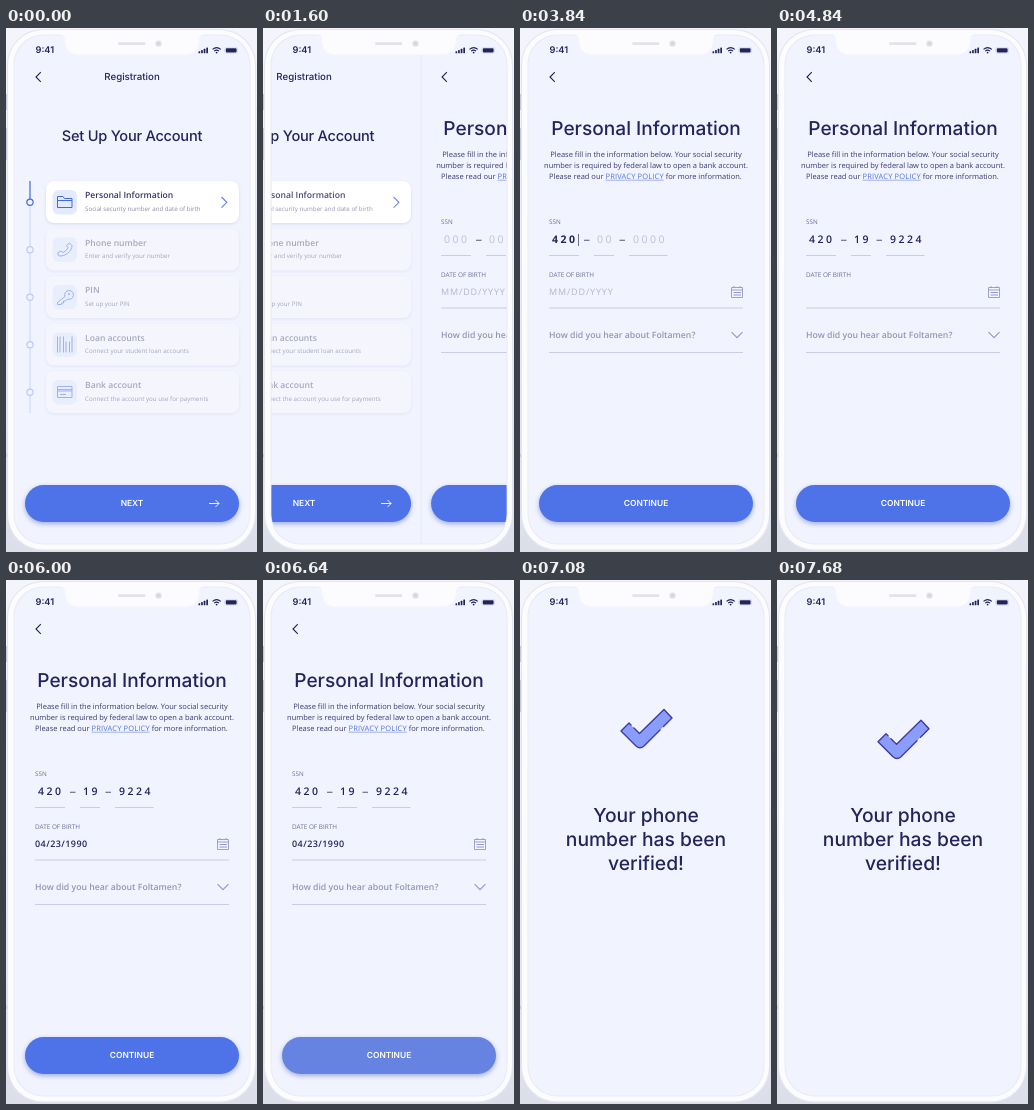
Recreate the animation shown at these times as an HTML page with a canvas. Size 251 by 524 pixels, loop 8000 ms.

```html
<!DOCTYPE html>
<html lang="en">
<head>
<meta charset="utf-8">
<title>Account setup</title>
<style>
html, body { margin: 0; width: 100%; height: 100%; overflow: hidden; background: #eef0f9; }
canvas { display: block; width: 251px; height: 524px; }
</style>
</head>
<body>
<canvas id="stage"></canvas>
<script>
const W = 251, H = 524, LOOP = 8000, PAGE = 234, MID = 126;
const NAVY = '#23245a', BLUE = '#4468dc', PALE = '#c9cce3', SCREEN = '#f1f3ff';
const HEAD = 'Inter, sans-serif', BODY = '"Open Sans", "Noto Sans", sans-serif';

const canvas = document.getElementById('stage');
const ctx = canvas.getContext('2d');
const ratio = window.devicePixelRatio || 1;
canvas.width = W * ratio;
canvas.height = H * ratio;

const clamp = v => Math.max(0, Math.min(1, v));
const ramp = (t, from, to) => clamp((t - from) / (to - from));
const ease = u => u < .5 ? 2 * u * u : 1 - 2 * (1 - u) * (1 - u);
const within = (t, ...spans) => spans.some(([a, b]) => t >= a && t < b);

function text(str, x, y, size, { font = BODY, weight = 400, color = NAVY, align = 'left', gap = 0 } = {}) {
  ctx.font = `${weight} ${size}px ${font}`;
  ctx.letterSpacing = gap + 'px';
  ctx.textAlign = align;
  ctx.fillStyle = color;
  ctx.fillText(str, x, y);
  return ctx.measureText(str).width;
}

function box(x, y, w, h, r, fill) {
  ctx.beginPath();
  ctx.roundRect(x, y, w, h, r);
  ctx.fillStyle = fill;
  ctx.fill();
}

function shadowed(color, blur, dy, draw) {
  ctx.save();
  ctx.shadowColor = color;
  ctx.shadowBlur = blur * ratio;
  ctx.shadowOffsetY = dy * ratio;
  draw();
  ctx.restore();
}

function stroke(path, color, width = 1) {
  ctx.strokeStyle = color;
  ctx.lineWidth = width;
  ctx.stroke(new Path2D(path));
}

function dot(x, y, r, fill) {
  ctx.beginPath();
  ctx.arc(x, y, r, 0, 7);
  ctx.fillStyle = fill;
  ctx.fill();
}

function backArrow() {
  stroke('M34.8 44.2L30 49L34.8 53.8', NAVY, 1.1);
}

function button(label, pressed = 0) {
  const mix = (a, b) => Math.round(a + (b - a) * pressed);
  const fill = `rgb(${mix(78, 102)},${mix(115, 131)},${mix(232, 226)})`;
  shadowed('rgba(60,85,180,.45)', 5, 2, () => box(19, 457, 214, 37, 18.5, fill));
  text(label, MID, 478.4, 8.4, { font: HEAD, weight: 600, color: '#fff', align: 'center' });
}

const steps = [
  ['Personal Information', 'Social security number and date of birth',
    'M51.5 179V168.5H57L58.5 170.5H66V179.5H51.5ZM51.5 172.5H66'],
  ['Phone number', 'Enter and verify your number',
    'M63.5 167.5L66 170C66 176 59 181 53 180.5L51.5 177.5L55 175.5L57 177C60 175.5 61 174 62 172L60.5 170Z'],
  ['PIN', 'Set up your PIN',
    'M59 173.5A4.4 4.4 0 1 1 61.5 176L59.5 178H57.5V180H55.5V181.5H51.5V179.5ZM62.5 170.5h1v1h-1z'],
  ['Loan accounts', 'Connect your student loan accounts',
    'M51.5 166V182M54 166V182M57.5 166V182M60 171V182M63.5 171V182M66 166V182'],
  ['Bank account', 'Connect the account you use for payments',
    'M51.5 168.5H66V179.5H51.5ZM51.5 171.5H66M51.5 173H66M54 176.5H60']
];

function setupPage(t) {
  backArrow();
  text('Registration', MID, 52.4, 9.7, { font: HEAD, weight: 500, align: 'center' });
  text('Set Up Your Account', MID, 113, 14.6, { font: HEAD, weight: 500, align: 'center', gap: -.25 });

  stroke('M24 177V385', '#cbd5f6');
  stroke('M24 153V171', BLUE, 1.2);
  steps.forEach(([title, note, icon], i) => {
    const first = i === 0;
    ctx.save();
    ctx.translate(0, i * 47.5);
    dot(24, 174.3, 3.7, first ? BLUE : '#bccaf5');
    dot(24, 174.3, 2.5, SCREEN);
    shadowed(first ? 'rgba(70,80,140,.16)' : 'rgba(70,80,140,.09)', 3, 1,
      () => box(40, 153, 193, 42, 8, first ? '#fff' : '#f5f6fd'));
    if (first) ctx.globalAlpha = 1 - .1 * ramp(t, 1240, 1360);
    box(46.5, 162, 24.5, 24.5, 6, first ? '#e3eafd' : '#e9eefc');
    stroke(icon, first ? BLUE : '#9db2ef');
    text(title, 79, 170.3, 8.6, { weight: 600, color: first ? '#34356a' : '#a6a8be' });
    text(note, 79, 182.6, 6.2, { color: first ? '#8b8da9' : '#a3a5bb' });
    if (first) stroke('M215.5 169L220.8 174.3L215.5 179.6', '#6387ea', 1.2);
    ctx.restore();
  });
  button('NEXT');
  stroke('M203 475.5H213M209.5 472L213 475.5L209.5 479', '#fff', .9);
}

function cursor(x, y, h) {
  ctx.fillStyle = '#4c4e80';
  ctx.fillRect(x, y, .8, h);
}

// Three digit groups share one running count of typed digits.
function ssnField(t) {
  const typed = t < 3640 ? 0 : Math.min(9, 1 + Math.floor((t - 3640) / 70));
  const active = within(t, [3640, 4240]);
  const showCursor = within(t, [2840, 3120], [3400, 4240]);
  let start = 0, caret = 31.2;
  for (const [digits, x] of [['420', 32], ['19', 77], ['9224', 113]]) {
    const n = Math.max(0, Math.min(digits.length, typed - start));
    const current = active && typed > start && typed <= start + digits.length;
    [...digits].forEach((d, i) => text(i < n ? d : '0', x + i * 8.5, 215.4, 10.5,
      i < n ? { weight: current ? 700 : 600 } : { color: '#bec0d7' }));
    if (n) caret = x + n * 8.5 + .5;
    start += digits.length;
  }
  stroke('M64 212.3H69.5M99.5 212.3H105', '#55577f', 1.1);
  stroke('M29 227.5H59M74 227.5H94M109 227.5H147.5', PALE);
  if (showCursor) cursor(caret, 206, 12);
}

function dateField(t) {
  const date = '04/23/1990';
  const typed = t < 5680 ? 0 : Math.min(10, 1 + Math.floor((t - 5680) / 32));
  ctx.globalAlpha = 1 - ramp(t, 4740, 4820);
  text('MM/DD/YYYY', 29, 266.7, 9, { color: '#b3b5cd', gap: .85 });
  ctx.globalAlpha = 1;
  const width = text(date.slice(0, typed), 29, 266.7, 9, { weight: 600, gap: .45 });
  if (within(t, [5000, 5320], [5520, 6000])) cursor(28.6 + width, 258, 10);
  stroke('M29 280H223', PALE);
  stroke('M211.5 259.5H222.5V269.5H211.5ZM211.5 262H222.5M214 258V260M220 258V260', '#9698c6', .9);
  stroke('M213.5 264.5H221M213.5 267H221', '#9698c6', 1);
}

function infoPage(t) {
  backArrow();
  text('Personal Information', MID, 106.7, 19.1, { font: HEAD, weight: 500, align: 'center' });

  const small = { color: '#3b3c6c', align: 'center' };
  text('Please fill in the information below. Your social security', MID, 128.6, 7.5, small);
  text('number is required by federal law to open a bank account.', MID, 139.6, 7.5, small);
  const run = { color: '#3b3c6c' }, link = { color: '#5576dc', gap: .15 };
  let x = 29;
  x += text('Please read our ', x, 150.6, 7.5, run);
  const w = text('PRIVACY POLICY', x, 150.6, 7.5, link);
  stroke(`M${x} 152.2h${w}`, '#7d97e6', .7);
  text(' for more information.', x + w, 150.6, 7.5, run);

  text('SSN', 29, 196.3, 6.3, { color: '#6d6f94' });
  ssnField(t);
  text('DATE OF BIRTH', 29, 248.6, 6.4, { color: '#6d6f94' });
  dateField(t);
  text('How did you hear about Foltamen?', 29, 310, 8.7, { weight: 600, color: '#9496b3' });
  stroke('M211.5 304.2L217 309.7L222.5 304.2', '#9698c6', 1.1);
  stroke('M29 324.5H223', PALE);
  button('CONTINUE', ramp(t, 6440, 6640));
}

function verifiedPage(t) {
  const drop = -11.5 + 12.3 * ease(ramp(t, 7040, 7280)) - .8 * ease(ramp(t, 7300, 7680));
  ctx.save();
  ctx.translate(0, 10.8 + drop);
  ctx.lineJoin = ctx.lineCap = 'round';
  ctx.fillStyle = '#8b9dfb';
  ctx.fill(new Path2D('M144 129.5L152 138L124 166Q120 169.5 116 166L101 151L109 143L119.5 153.5Z'));
  stroke('M143.5 146.5L152 138L144 129.5L119.5 153.5L114 148' +
    'M111 145L109 143L101 151L116 166Q120 169.5 124 166L140 150', '#3d3ca5', 1.4);
  ctx.restore();
  ['Your phone', 'number has been', 'verified!'].forEach((line, i) =>
    text(line, MID, 242.3 + i * 23.6, 19.3, { font: HEAD, weight: 500, align: 'center' }));
}

const pages = [setupPage, infoPage, verifiedPage];

function phone() {
  const bg = ctx.createLinearGradient(0, 0, 0, H);
  bg.addColorStop(0, '#f4f5fc');
  bg.addColorStop(.5, '#e8eaf4');
  bg.addColorStop(1, '#dcdfea');
  ctx.fillStyle = bg;
  ctx.fillRect(0, 0, W, H);
  ctx.fillStyle = '#c6cad9';
  [[66, 16], [100, 32], [426, 3]].forEach(([y, h]) => ctx.fillRect(0, y, 1, h));
  box(1, 1, 249, 522, 36, '#e3e5ee');
  box(2, 2, 247, 519.5, 35, '#fcfcfe');
  box(7.5, 6.5, 237, 510, 30, '#e9ebf3');
  box(8.5, 7.5, 235, 508, 29, SCREEN);
}

function statusBar() {
  ctx.beginPath();
  ctx.moveTo(54, 6);
  ctx.quadraticCurveTo(59, 7, 59, 12);
  ctx.quadraticCurveTo(59, 26.5, 73, 26.5);
  ctx.lineTo(179, 26.5);
  ctx.quadraticCurveTo(193, 26.5, 193, 12);
  ctx.quadraticCurveTo(193, 7, 198, 6);
  ctx.fillStyle = '#fcfcfe';
  ctx.fill();
  box(112, 14.3, 27.5, 2.6, 1.3, '#e2e3ea');
  dot(152.5, 15.6, 3.2, '#e0e1e8');
  dot(152.5, 15.6, 1.5, '#d2d4de');

  text('9:41', 29.5, 25.4, 9.2, { font: HEAD, weight: 600 });
  for (let i = 0; i < 4; i++) box(192.5 + i * 2.6, 23.2 - i * 1.2, 1.7, 2 + i * 1.2, .5, NAVY);
  stroke('M206.5 21.4Q210.6 17.8 214.8 21.4M208.2 23.2Q210.6 21 213 23.2', NAVY, 1.1);
  dot(210.6, 24.6, .9, NAVY);
  box(218.6, 19.2, 13.2, 6.4, 1.8, '#c4c6dc');
  box(219, 19.6, 12.4, 5.6, 1.5, SCREEN);
  box(219.8, 20.3, 10.8, 4.2, .9, NAVY);
}

function render(t) {
  ctx.setTransform(ratio, 0, 0, ratio, 0, 0);
  ctx.textRendering = 'geometricPrecision';
  phone();
  const scroll = ease(ramp(t, 1483, 1760)) + ease(ramp(t, 6720, 7000));
  ctx.save();
  ctx.beginPath();
  ctx.roundRect(8.5, 7.5, 235, 508, 29);
  ctx.clip();
  pages.forEach((page, i) => {
    const x = (i - scroll) * PAGE;
    if (Math.abs(x) >= PAGE) return;
    ctx.save();
    ctx.translate(x, 0);
    if (x > 0) {
      ctx.fillStyle = 'rgba(70,80,150,.06)';
      ctx.fillRect(8.5, 27, 1, 488);
    }
    page(t);
    ctx.restore();
  });
  ctx.restore();
  statusBar();
}

function tick() {
  render(performance.now() % LOOP);
  requestAnimationFrame(tick);
}
tick();
</script>
</body>
</html>
```
